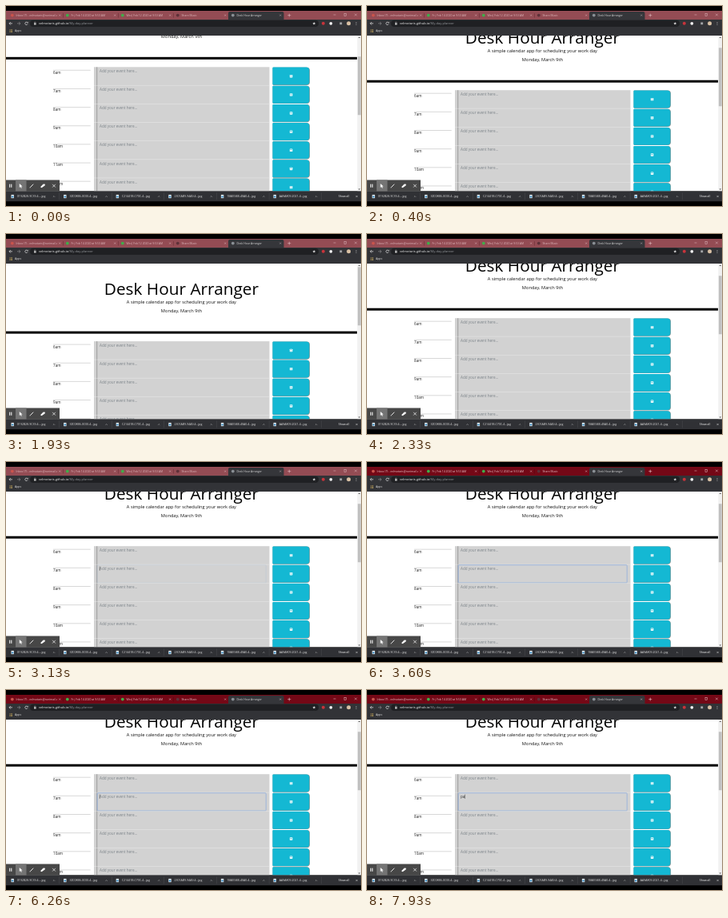
Recreate the animation shown at these times as an HTML page with a canvas. Size 444 px wide and 250 px high, loop 8 s.

```html
<!DOCTYPE html>
<html lang="en">
<head>
<meta charset="utf-8">
<title>Desk Hour Arranger</title>
<style>
html, body { margin: 0; width: 100%; height: 100%; overflow: hidden; background: #000; }
canvas { display: block; width: 444px; height: 250px; }
</style>
</head>
<body>
<canvas id="stage"></canvas>
<script>
const W = 444, H = 250, LOOP = 8000;
const canvas = document.getElementById('stage');
const ctx = canvas.getContext('2d');
const ratio = window.devicePixelRatio || 1;
canvas.width = W * ratio;
canvas.height = H * ratio;

const FONT = '"Open Sans", "Noto Sans", sans-serif';
const TITLE = 'Desk Hour Arranger';
const TICK = 28.9;        // one wheel notch
const ROW = 23.15;
const PAGE = { top: 37, bottom: 231.5, right: 439.4 };

const clamp = (v, a, b) => Math.min(b, Math.max(a, v));

function rect(x, y, w, h, color) {
  ctx.fillStyle = color;
  ctx.fillRect(x, y, w, h);
}

function round(x, y, w, h, r, color) {
  ctx.beginPath();
  ctx.roundRect(x, y, w, h, r);
  ctx.fillStyle = color;
  ctx.fill();
}

function dot(x, y, r, color) {
  ctx.beginPath();
  ctx.arc(x, y, r, 0, Math.PI * 2);
  ctx.fillStyle = color;
  ctx.fill();
}

// points: flat list of x, y pairs
function trace(points) {
  ctx.beginPath();
  for (let i = 0; i < points.length; i += 2) ctx.lineTo(points[i], points[i + 1]);
}

function line(points, color, width = 0.6) {
  trace(points);
  ctx.strokeStyle = color;
  ctx.lineWidth = width;
  ctx.stroke();
}

function poly(points, color) {
  trace(points);
  ctx.fillStyle = color;
  ctx.fill();
}

function text(str, x, y, size, color, align = 'left') {
  ctx.font = `${size}px ${FONT}`;
  ctx.textAlign = align;
  ctx.fillStyle = color;
  ctx.fillText(str, x, y);
}

function clipped(x, y, w, h, draw) {
  ctx.save();
  ctx.beginPath();
  ctx.rect(x, y, w, h);
  ctx.clip();
  draw();
  ctx.restore();
}

function cross(x, y, r, color, width = 0.6) {
  line([x - r, y - r, x + r, y + r], color, width);
  line([x - r, y + r, x + r, y - r], color, width);
}

function scrollAt(t) {
  if (t < 400) return 2 * TICK;
  if (t < 460) return TICK;
  return t < 2330 ? 0 : TICK;
}

function tabStrip(t) {
  // the window gains focus and its title bar deepens
  const k = clamp((t - 3130) / 330, 0, 1);
  const mix = (a, b) => Math.round(a + (b - a) * k);
  rect(0, 6, W, 11, `rgb(${mix(148, 116)},${mix(76, 8)},${mix(84, 22)})`);
  const ink = `rgba(255,235,238,${0.7 + 0.15 * k})`;

  const tabs = [
    ['Inbox (7) - velmotaris@norimail.com', '#c9544c'],
    ['Fri, Feb 14 2020 at 9:53 AM', '#3fae49'],
    ['Wed, Feb 12 2020 at 9:53 AM', '#3fae49'],
    ['Share Music', '#5d3038'],
    [TITLE, '#8b9096']
  ];
  tabs.forEach(([label, color], i) => {
    const x = 2 + i * 69;
    const active = i === 4;
    if (active) round(x, 7, 69.5, 10, [2, 2, 0, 0], '#35363a');
    else if (i < 3) rect(x + 69, 9, 0.4, 5.5, 'rgba(50,0,10,.6)');
    dot(x + 5.8, 11.6, 1.9, color);
    clipped(x + 9, 7, 53, 10, () => text(label, x + 10.5, 12.8, 3.4, active ? '#dedede' : ink));
    cross(x + 65.2, 11.6, 1, ink, 0.45);
  });

  line([352.3, 11.6, 356.3, 11.6], ink);
  line([354.3, 9.6, 354.3, 13.6], ink);
  line([409.5, 11, 412.5, 11], ink, 0.5);
  ctx.strokeStyle = ink;
  ctx.lineWidth = 0.5;
  ctx.strokeRect(423, 9.6, 2.7, 2.7);
  cross(437.4, 11, 1.4, ink, 0.5);
}

function toolbar() {
  rect(0, 17, W, 20, '#323337');
  round(30, 17.8, 361, 8.2, 4.1, '#1f2023');

  for (const [x, s, color] of [[6, 1, '#e3e3e3'], [16, -1, '#8b8c8f']]) {
    line([x - 2, 21.8, x + 2, 21.8], color, 0.7);
    line([x - s * 0.2, 20, x - s * 2, 21.8, x - s * 0.2, 23.6], color, 0.7);
  }
  ctx.beginPath();
  ctx.arc(25.5, 21.8, 1.7, 0.4, 5.6);
  ctx.strokeStyle = '#e3e3e3';
  ctx.lineWidth = 0.7;
  ctx.stroke();
  poly([26, 21.3, 27.6, 21.3, 27.6, 19.7], '#e3e3e3');

  rect(35, 21.3, 2.6, 2.2, '#c8c8c8');
  line([35.5, 21.4, 35.5, 20.1, 37.1, 20.1, 37.1, 21.4], '#c8c8c8', 0.4);

  const host = 'velmotaris.github.io';
  text(host, 41, 23.2, 4, '#f2f2f2');
  text('/My-day-planner', 41 + ctx.measureText(host).width, 23.2, 4, '#96999d');

  const star = [];
  for (let i = 0; i < 10; i++) {
    const a = -Math.PI / 2 + i * Math.PI / 5, r = i % 2 ? 0.9 : 2;
    star.push(385.3 + r * Math.cos(a), 21.9 + r * Math.sin(a));
  }
  poly(star, '#d8d8d8');
  dot(396.8, 21.8, 2, '#c8343b');
  dot(406.3, 21.8, 1.9, '#f2f2f2');
  rect(417.4, 20.4, 2.8, 2.8, '#a7a9ac');
  dot(428.6, 21.8, 2.5, '#d8c0a4');
  for (let i = -1; i <= 1; i++) dot(438, 21.8 + i * 1.4, 0.45, '#eee');

  for (let i = 0; i < 9; i++) {
    rect(4.5 + (i % 3) * 1.3, 29.4 + Math.floor(i / 3) * 1.3, 0.9, 0.9, '#c0a45c');
  }
  text('Apps', 11, 32.3, 3.5, '#dedede');
}

function saveIcon(x, y) {
  round(x - 1.7, y - 1.7, 3.4, 3.4, 0.4, '#fff');
  rect(x - 1, y - 1.1, 1.7, 0.8, '#14b2cd');
  dot(x, y + 0.7, 0.45, '#14b2cd');
}

function plannerRow(i, y, t) {
  const hour = 6 + i;
  const label = (hour > 12 ? hour - 12 : hour) + (hour < 12 ? 'am' : 'pm');

  ctx.setLineDash([0.7, 0.3]);
  line([59, y + 4, 105.5, y + 4], '#8f8f8f', 0.5);
  ctx.setLineDash([]);
  text(label, 59, y + 8.4, 4.6, '#222');

  rect(110, y, 219.5, ROW, '#d2d2d2');
  rect(110, y + ROW - 0.5, 219.5, 0.5, '#e6e6e6');
  rect(113.6, y, 0.5, ROW - 0.4, '#666');

  const focused = i === 1 && t >= 3130;
  if (focused) {
    ctx.globalAlpha = clamp((t - 3100) / 150, 0, 1);
    ctx.beginPath();
    ctx.roundRect(114.2, y + 0.4, 211, 22.2, 0.8);
    ctx.strokeStyle = '#86aade';
    ctx.lineWidth = 0.7;
    ctx.stroke();
    ctx.globalAlpha = 1;
  }

  const typed = !focused || t < 7660 ? '' : t < 7930 ? 'p' : 'pa';
  if (typed) text(typed, 117, y + 6.5, 4.6, '#333');
  else text('Add your event here...', 117, y + 6.5, 4.6, '#7c8389');

  if (focused) {
    const on = typed || Math.floor((t - 3600) / 532) % 2;
    const x = 116.9 + (typed ? ctx.measureText(typed).width : 0);
    if (on) rect(x, y + 2.3, 0.4, 5.2, '#111');
  }

  round(333.6, y + 0.4, 46.4, 22.2, [1, 4, 4, 1], '#8a8f8c');
  round(333.4, y + 0.3, 46, 21.9, [1, 4, 4, 1], '#14b8d3');
  saveIcon(356.6, y + 11.4);
}

function page(t) {
  const scroll = scrollAt(t);
  rect(0, PAGE.top, W, PAGE.bottom - PAGE.top, '#fff');
  clipped(0, PAGE.top, PAGE.right, PAGE.bottom - PAGE.top, () => {
    const top = -scroll;
    text(TITLE, 219.4, top + 75.5, 20.8, '#000', 'center');
    text('A simple calendar app for scheduling your work day', 219.4, top + 87.2, 5.7, '#111', 'center');
    text('Monday, March 9th', 219.4, top + 97.7, 5.7, '#111', 'center');
    rect(0, top + 121.6, PAGE.right, 3, '#000');
    for (let i = 0; i < 14; i++) {
      const y = top + 134.1 + i * ROW;
      if (y < PAGE.bottom && y + ROW > PAGE.top) plannerRow(i, y, t);
    }
  });

  rect(PAGE.right, PAGE.top, W - PAGE.right, PAGE.bottom - PAGE.top, '#f1f1f1');
  rect(439.9, 41.3 + scroll * 0.38, 3.8, 73, '#c1c1c1');
  poly([440.5, 40, 443.1, 40, 441.8, 38.5], '#555');
  poly([440.5, 228.5, 443.1, 228.5, 441.8, 230], '#555');
}

function downloads() {
  rect(0, PAGE.bottom, W, 12.7, '#303135');
  const files = ['0192B28-9C39-4-...jpg', '3ZC08B6-0C00-4...jpg', 'C21441B-C70C-4...jpg',
    '2301AB9-94A9-4...jpg', '1MA594B-40A0-4...jpg', 'AA9A809-2021-4...jpg'];
  files.forEach((name, i) => {
    const x = i * 65.6;
    rect(x + 6.5, 235.9, 3.4, 4.3, '#e8eef2');
    rect(x + 7, 237.4, 2.4, 2, '#3f8fc4');
    text(name, x + 13.8, 239.3, 3.5, '#e2e2e2');
    line([x + 58.9, 238.7, x + 60, 237.6, x + 61.1, 238.7], '#ccc', 0.5);
    rect(x + 66.5, 233.5, 0.3, 8.8, '#5c5d60');
  });
  text('Show all', 422.6, 239.2, 3.5, '#fff', 'center');
  cross(438.6, 238, 1.1, '#ddd', 0.5);
}

function recorder() {
  rect(0, 217.5, 67, 14, '#474747');
  rect(12, 217.5, 13.5, 14, '#747474');
  rect(4.2, 222.6, 1, 4.2, '#fff');
  rect(6.3, 222.6, 1, 4.2, '#fff');
  poly([16.8, 221.9, 16.8, 227, 18.1, 225.9, 19, 227.7, 19.8, 227.3, 19, 225.6, 20.6, 225.4], '#fff');
  line([30.4, 226.6, 34.2, 222.7], '#fff', 0.9);
  poly([29.6, 227.4, 29.9, 226.2, 30.8, 227.1], '#fff');
  poly([43, 226.2, 46.7, 222.6, 49, 222.8, 48.5, 224.6, 44.6, 227.2], '#fff');
  cross(60, 224.7, 1.9, '#fff', 0.7);
}

function draw(t) {
  ctx.setTransform(ratio, 0, 0, ratio, 0, 0);
  rect(0, 0, W, H, '#000');
  page(t);
  tabStrip(t);
  toolbar();
  downloads();
  recorder();
}

const start = performance.now();
function loop() {
  draw((performance.now() - start) % LOOP);
  requestAnimationFrame(loop);
}
loop();
</script>
</body>
</html>
```
